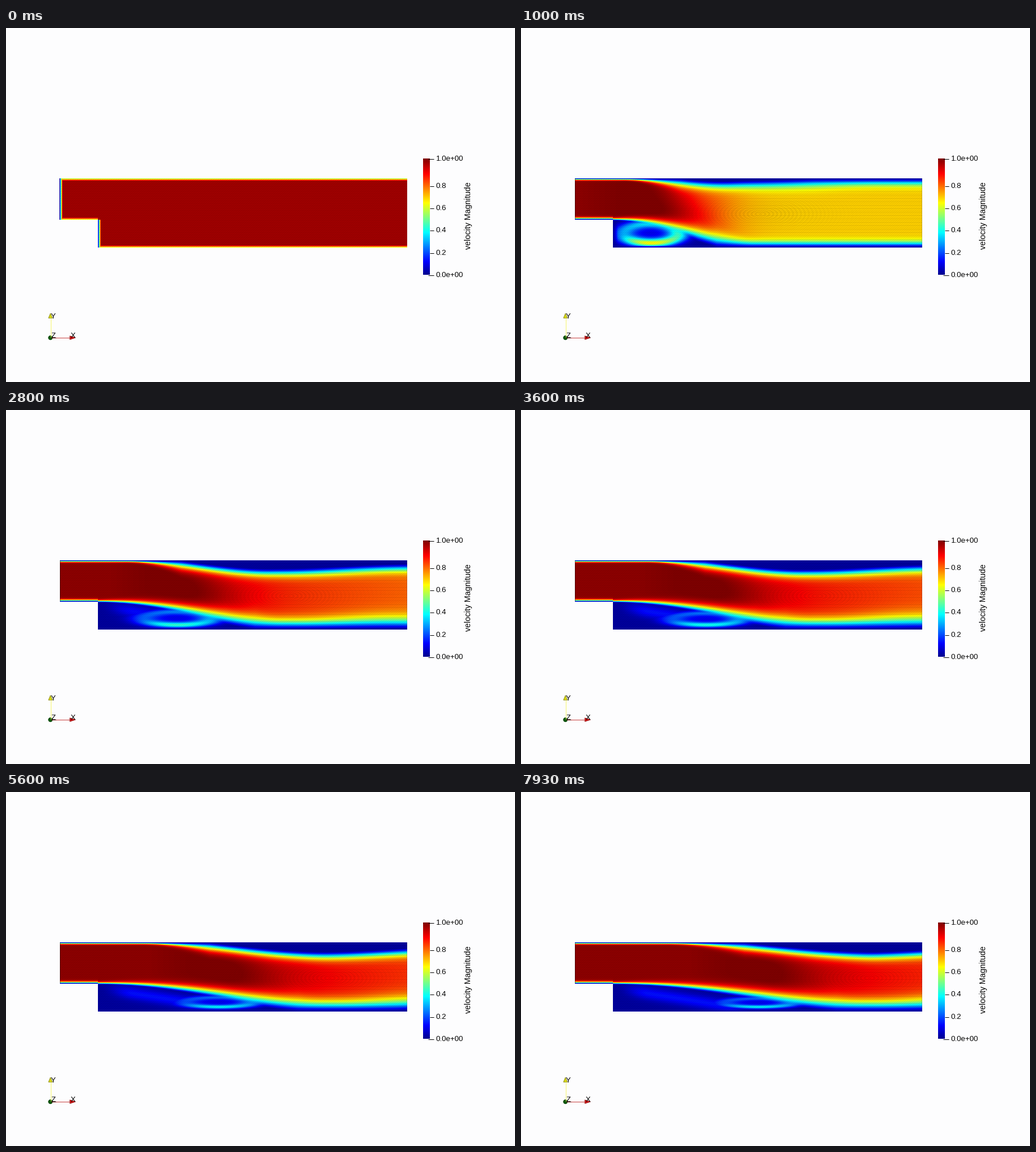
A matplotlib script that plays this animation: 897x624 px, repeating every 8000 ms.

```python
import numpy as np
import matplotlib.pyplot as plt
from matplotlib.animation import FuncAnimation
from matplotlib.colors import LinearSegmentedColormap
from matplotlib.patches import Circle, Polygon

W, H, DPI = 897, 624, 100
FRAMES, LOOP = 120, 8000
LEFT, RIGHT, TOP, BOTTOM = 94, 707, 265, 387
STEP_X, STEP_Y = 162, 338

plt.rcParams["font.family"] = "Liberation Sans"

STOPS = [(0, (0, 0, .5625)), (.111, (0, 0, 1)), (.365, (0, 1, 1)),
         (.492, (.5, 1, .5)), (.619, (1, 1, 0)), (.873, (1, 0, 0)),
         (1, (.5, 0, 0))]
jet = LinearSegmentedColormap.from_list("speed", STOPS, N=512)

xs = np.arange(LEFT, RIGHT) + .5
ys = np.arange(TOP, BOTTOM) + .5
X, Y = np.meshgrid(xs, ys)
inside = (X > STEP_X) | (Y < STEP_Y)


def ramp(v, lo, hi):
    z = np.clip((v - lo) / (hi - lo), 0, 1)
    return z * z * (3 - 2 * z)


def layer(z):
    """Speed across a wall layer, 0 at the wall and 1 far away."""
    return 1 - np.exp(-np.maximum(z, 0) ** 1.6)


def layer_pos(q):
    return (-np.log(1 - np.clip(q, 0, .98))) ** (1 / 1.6)


def settle(t, rate=1):
    """Falls from 1 at one second towards 0."""
    return np.exp(-(t - 1) / rate)


def start_speed():
    wall = np.where(Y < STEP_Y, LEFT + .5, STEP_X)
    side = np.where((Y > STEP_Y) | (X < STEP_X), (X - wall) / 5.5, 1)
    top = .5 + (Y - TOP) / 10
    floor = np.where(X < STEP_X, STEP_Y, BOTTOM)
    low = .56 + (floor - Y) / 10
    return np.clip(np.minimum(np.minimum(side, .965), np.minimum(top, low)), 0, 1)


def front(t):
    """Where the flow meets the floor again behind the step."""
    return STEP_X + 150 * (t ** .4 if t > 1 else t ** .55)


def core_speed(u, t):
    late = max(0, 1 - settle(t))
    drop = min(.4, .13 + .22 * settle(t, 1.15)) + .0003 * late * np.maximum(u - 60, 0)
    return 1 - drop * (1 - np.exp(-(np.maximum(u + 90, 0) / 118) ** 2.2))


def upper_layer(u, fx, t, edge):
    depth = 25 * (1 - np.exp(-t / 1.1))
    y = 267 + depth * (ramp(u, -.6 * (fx - 95), 50 + 10 * t) - .3 * ramp(u, 100, 320))
    width = np.minimum(11.5, (y - TOP - .3) / edge)
    return layer((Y - y) / width + edge)


def lower_layer(u, fx, t, edge):
    span = fx - STEP_X
    p = np.clip((xs - STEP_X) / (span + 100), 0, 1) ** 1.15
    y = 336.8 + (35 + 4 * settle(t)) * ramp(p, 0, 1)
    y -= 5 * ramp(u, 120, 300) * max(0, 1 - settle(t))
    y = np.where(xs < STEP_X, 335.5, y)
    wall = np.where(xs < STEP_X, STEP_Y + .3, BOTTOM)
    width = 3 + 16 * np.clip((xs - STEP_X) / span, 0, 1) ** 1.3
    width = np.minimum(width, (wall - y) / edge)
    return layer((y - Y) / width + edge)


def vortex(fx, t):
    span = fx - STEP_X
    xc = fx - min(86, .55 * span)
    yc = 372 - 10 * min(settle(t, 2.5), 1.2)
    a, b = min(60, .32 * span), 379 - yc
    back = .28 + .27 * min(settle(t, 1.2), 1)
    dx, dy = (X - xc) / a, (Y - yc) / b
    r = np.hypot(dx, dy) + 1e-6
    down = np.clip(dy / r, 0, 1) ** 2
    side = .5 + .12 * dx / r
    v = back * (side + (1 - side) * down) * np.exp(-((r - 1) / .42) ** 2)
    v += .08 * np.exp(-(r / 1.4) ** 4)
    # Slow drift from the corner into the vortex
    drift = np.exp(-((Y - 348 - .16 * (X - 180)) / 11) ** 2)
    drift = drift * ramp(X, 165, 225) * ramp(xc - X, 0, 60)
    v = np.maximum(v, .11 * min(t / 3, 1) * drift)
    return v * np.clip((BOTTOM - Y) / 4, 0, 1) * np.clip((X - STEP_X) / 9, 0, 1) * (Y > 336)


def flow_speed(t):
    fx = front(t)
    u = xs - fx
    tilt = .6 * (Y - 318) * np.exp(-(np.maximum(X - fx, 0) / 45) ** 2)
    core = core_speed(X - fx - tilt, t) * (1 - .03 * np.clip((fx - 60 - X) / 150, 0, 1))
    edge = layer_pos(.5 / core_speed(u, t))
    lower = lower_layer(u, fx, t, edge)
    stream = core * upper_layer(u, fx, t, edge) * lower
    return np.clip(np.hypot(stream, vortex(fx, t) * (1 - lower)) + .015, 0, 1)


rows = np.where(Y.astype(int) % 3 == 0, .93, 1.0)
dots = np.where((X.astype(int) + Y.astype(int)) % 4 == 0, .95, 1.0)
GRAIN = rows * dots


def shade(t):
    fx = front(t)
    r = np.hypot(X - fx - 110, 2.5 * (Y - 328))
    fade = np.exp(-((X - fx - 110) / 110) ** 2 - ((Y - 326) / 26) ** 2)
    arcs = 1 - .035 * fade * (1 + np.sin(r * .9))
    streak = np.where(Y.astype(int) % 6 == 0, .06, 0) * ramp(X, fx + 40, fx + 120)
    return GRAIN * arcs * (1 - streak)


def picture(i):
    t = i * LOOP / FRAMES / 1000
    rgba = jet(flow_speed(t) if i else start_speed())
    rgba[..., :3] *= (shade(t) if i else GRAIN)[..., None]
    if i:
        rgba[:72, 1, :3] *= .6
        rgba[:, -1, :3] *= .85
    rgba[..., 3] = inside
    rgba[:, 0, 3] = 0 if i else .8 * inside[:, 0]
    return rgba


fig = plt.figure(figsize=(W / DPI, H / DPI), dpi=DPI, facecolor="#fdfdfe")
ax = fig.add_axes([0, 0, 1, 1])
ax.axis("off")


def label(x, y, s, px, va="center_baseline", **kw):
    ax.text(x, y, s, fontsize=px * 72 / DPI, color="black", va=va, **kw)


def stroke(x, y, color):
    ax.plot(x, y, color=color, lw=72 / DPI, solid_capstyle="butt")


def draw_scale():
    bar = jet(np.linspace(1, 0, 205))[:, None, :]
    ax.imshow(bar, extent=(735, 747, 435, 230), interpolation="nearest", aspect="auto")
    marks = [(435 - 39.25 * k, f"{k / 5:.1f}") for k in range(1, 5)]
    for y, s in marks + [(230, "1.0e+00"), (435, "0.0e+00")]:
        y = round(y)
        stroke([744 if "e" in s else 747, 754], [y + .5, y + .5], "black")
        label(758, y - .5, s, 13.2)
    label(815.5, 331, "velocity Magnitude", 14.25, rotation=90, ha="center", va="center")


def draw_axes():
    stroke([78.5, 78.5], [511, 545], "#f6f66a")
    stroke([80, 114], [546, 546], "#c84040")
    stroke([80, 88], [546, 546], "#701818")
    ax.add_patch(Polygon([(78.3, 503), (74.8, 511.3), (81.8, 511.3)],
                         fc="#d8d810", ec="#77770a", lw=.5))
    ax.add_patch(Polygon([(122.5, 546), (112.5, 542.8), (112.5, 549.2)],
                         fc="#d01010", ec="#800a0a", lw=.5))
    ax.add_patch(Circle((78.3, 546), 3.6, fc="#0a5a0a", ec="#063c06", lw=.5))
    for x, y, s in [(83.5, 507, "Y"), (118.5, 542, "X"), (84, 541.5, "Z")]:
        label(x, y, s, 13, ha="center")


draw_scale()
draw_axes()
field = ax.imshow(picture(0), extent=(LEFT, RIGHT, BOTTOM, TOP),
                  interpolation="nearest", aspect="auto")
ax.set_xlim(0, W)
ax.set_ylim(H, 0)


def update(i):
    field.set_data(picture(i))
    return [field]


anim = FuncAnimation(fig, update, frames=FRAMES, interval=LOOP / FRAMES,
                     repeat=True, repeat_delay=0, blit=False)
plt.show()
```
